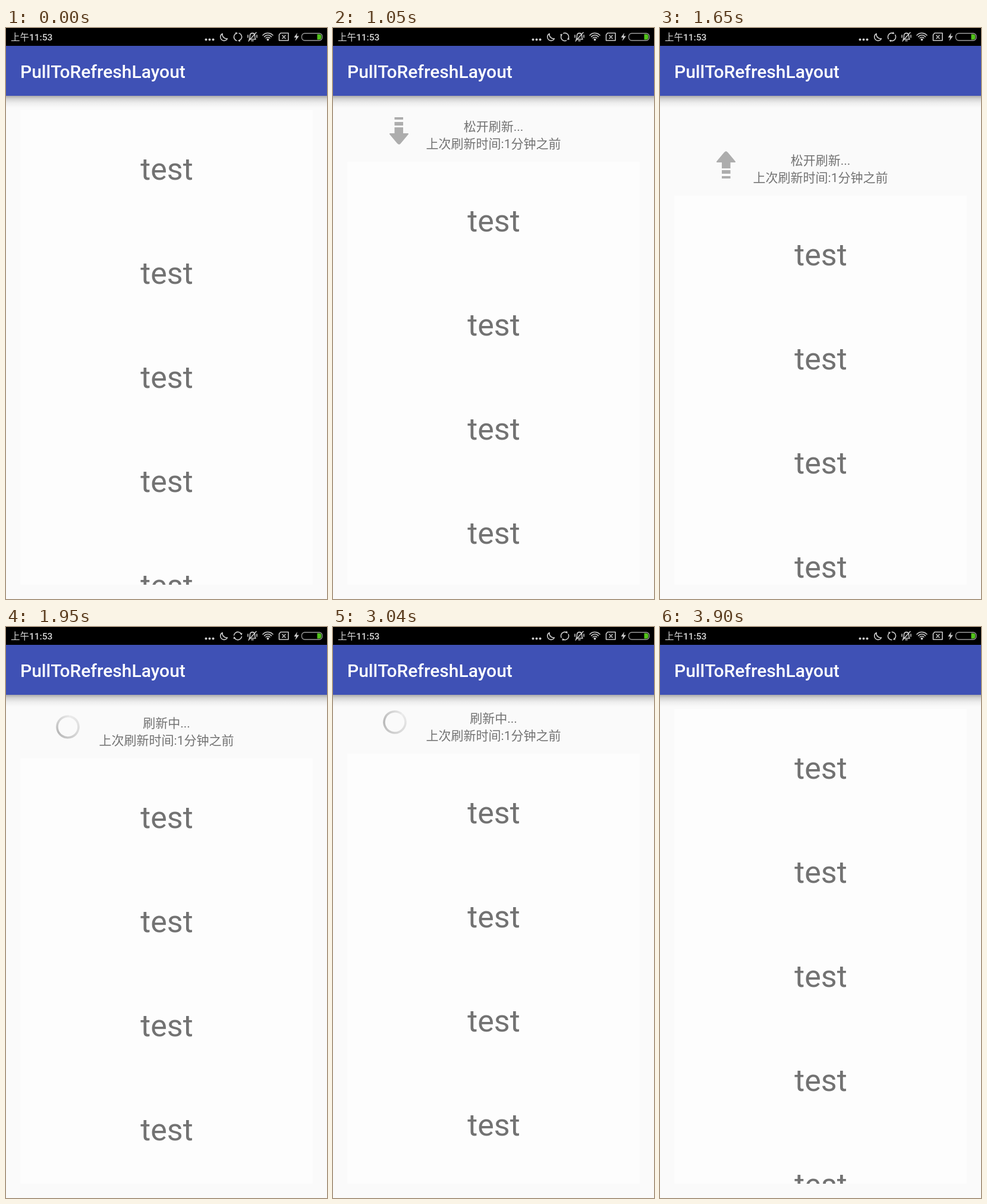
These frames come from a looping animation (540x960 px, 4020 ms). An HTML page with a canvas:

```html
<!DOCTYPE html>
<html lang="zh">
<head>
<meta charset="utf-8">
<title>PullToRefreshLayout</title>
<style>
  html, body { margin: 0; width: 100%; height: 100%; overflow: hidden; background: #fafafa; }
  canvas { display: block; }
</style>
</head>
<body>
<canvas id="stage" width="540" height="960"></canvas>
<script>
const ctx = document.getElementById('stage').getContext('2d');
const LOOP = 4020, TAU = Math.PI * 2;
const LIST = { left: 24, top: 138, right: 516, bottom: 936, row: 175 };
const HEADER = 75, RELEASE = 1750, CLOSE = 3327, SETTLE = 300, FLIP = 1050;
const FONT = 'Roboto, "Noto Sans CJK SC", "Noto Sans CJK", sans-serif';
const PAGE = '#fafafa', ICON = '#cbcbcb', INK = '#727272';

// Finger position while dragging: [ms, px]
const drag = [[620, 0], [700, 9], [790, 28], [920, 59], [1050, 87],
              [1200, 112], [1400, 133], [1650, 144], [RELEASE, 145]];

const clamp = v => Math.min(1, Math.max(0, v));
const decelerate = p => 1 - (1 - clamp(p)) ** 2;
const smooth = p => (1 - Math.cos(Math.PI * clamp(p))) / 2;

function pullAt(t) {
  if (t <= drag[0][0]) return 0;
  if (t >= CLOSE) return HEADER * (1 - decelerate((t - CLOSE) / SETTLE));
  if (t >= RELEASE) return 145 + (HEADER - 145) * decelerate((t - RELEASE) / SETTLE);
  const i = drag.findIndex(([time]) => time >= t);
  const [t0, y0] = drag[i - 1], [t1, y1] = drag[i];
  return y0 + (y1 - y0) * (t - t0) / (t1 - t0);
}

function text(str, x, y, size, color, align = 'center', weight = 400) {
  ctx.font = `${weight} ${size}px ${FONT}`;
  ctx.fillStyle = color;
  ctx.textAlign = align;
  ctx.fillText(str, x, y);
}

function rect(x, y, w, h, color) {
  ctx.fillStyle = color;
  ctx.fillRect(x, y, w, h);
}

function at(x, y, angle, paint) {
  ctx.save();
  ctx.translate(x, y);
  ctx.rotate(angle);
  paint();
  ctx.restore();
}

const fillPath = d => ctx.fill(new Path2D(d));
const strokePath = d => ctx.stroke(new Path2D(d));

function arc(x, y, r, from, to) {
  ctx.beginPath();
  ctx.arc(x, y, r, from, to);
  ctx.stroke();
}

function dot(x, y, r) {
  ctx.beginPath();
  ctx.arc(x, y, r, 0, TAU);
  ctx.fill();
}

function statusBar(t) {
  rect(0, 0, 540, 30, '#000');
  text('上午11:53', 8, 21, 15.5, '#d8d8d8', 'left', 500);
  ctx.strokeStyle = ctx.fillStyle = ICON;
  ctx.lineWidth = 1.6;
  ctx.lineCap = ctx.lineJoin = 'round';

  for (const x of [336.5, 342.5, 348.5]) dot(x, 19.5, 2);
  strokePath('M364 9.5A6.3 6.3 0 1 0 372.5 18A7.5 7.5 0 0 1 364 9.5Z');

  // Sync icon: two arcs with small tips, half a turn per 1340 ms
  at(390, 15, Math.PI * t / 1340, () => {
    for (const turn of [0, Math.PI]) at(0, 0, turn, () => {
      arc(0, 0, 6.6, -1.25, 1.25);
      fillPath('M0 6.6L3.5 4L4 8.2Z');
    });
  });

  strokePath('M409 19H420C418 17 419 14 418.5 12C417.5 7.5 411.5 7.5 410.5 12C410 15 411 17 409 19Z' +
             'M413 21.5H416M407 12V16M422 12V16M408 22L421 7.5');

  for (const r of [4.5, 8, 11.5]) arc(440.5, 20, r, -2.4, -0.74);
  dot(440.5, 19.5, 1.9);

  strokePath('M462 8.5H475V21H459.5V11.5ZM465 12.5L470 17.5M470 12.5L465 17.5');
  fillPath('M490 8L484.5 16H488L486.5 22L493 13.5H489Z');

  ctx.strokeStyle = '#9c9c9c';
  ctx.lineWidth = 1.3;
  ctx.beginPath();
  ctx.roundRect(497.5, 9, 34.5, 12, 5);
  ctx.stroke();
  ctx.fillStyle = '#52c41a';
  ctx.beginPath();
  ctx.roundRect(523.5, 10.5, 7, 9, [0, 3.5, 3.5, 0]);
  ctx.fill();
}

function appBar() {
  rect(0, 30, 540, 84, '#3f51b5');
  text('PullToRefreshLayout', 24, 84, 30, '#fff', 'left', 500);
  const shadow = ctx.createLinearGradient(0, 114, 0, 134);
  shadow.addColorStop(0, 'rgba(0,0,0,.32)');
  shadow.addColorStop(.25, 'rgba(0,0,0,.16)');
  shadow.addColorStop(.6, 'rgba(0,0,0,.05)');
  shadow.addColorStop(1, 'rgba(0,0,0,0)');
  rect(0, 114, 540, 20, shadow);
}

function arrow(x, y, angle) {
  at(x, y, angle, () => {
    ctx.fillStyle = ctx.strokeStyle = '#adadad';
    fillPath('M-7.5 -23H7V-19H-7.5ZM-7.5 -15H7V-9H-7.5ZM-7.5 -6H7V6H-7.5Z');
    ctx.lineWidth = 2;
    ctx.lineJoin = 'round';
    const head = 'M-15 5H15L2 20.5Q0 23 -2 20.5Z';
    fillPath(head);
    strokePath(head);
  });
}

function spinner(x, y, t) {
  at(x, y, (t - 2360) / 1000 * TAU, () => {
    const sweep = ctx.createConicGradient(Math.PI * .35, 0, 0);
    sweep.addColorStop(0, '#ececec');
    sweep.addColorStop(.3, '#dadada');
    sweep.addColorStop(.65, '#b8b8b8');
    sweep.addColorStop(1, '#e8e8e8');
    ctx.strokeStyle = sweep;
    ctx.lineWidth = 3.6;
    arc(0, 0, 18, 0, TAU);
  });
}

function header(top, t) {
  const line = (str, dy) => text(str, 270, top + dy, 21, INK);
  if (t < RELEASE) {
    arrow(111, top - 52, Math.PI * smooth((t - FLIP) / 200));
    if (top - LIST.top < HEADER) return line('下拉刷新...', -37);
    line('松开刷新...', -52);
  } else {
    spinner(104, top - 53, t);
    line('刷新中...', -52);
  }
  line('上次刷新时间:1分钟之前', -23);
}

function list(t) {
  const pull = Math.round(pullAt(t)), top = LIST.top + pull;
  ctx.save();
  ctx.beginPath();
  ctx.rect(LIST.left, LIST.top, LIST.right - LIST.left, LIST.bottom - LIST.top);
  ctx.clip();
  if (pull > 0) header(top, t);
  rect(LIST.left, top, LIST.right - LIST.left, LIST.bottom - top, '#fdfdfd');
  for (let i = 0; i < 5; i++) text('test', 270.5, top + 117 + i * LIST.row, 52, INK);
  ctx.restore();
}

function frame(now) {
  const t = now % LOOP;
  rect(0, 0, 540, 960, PAGE);
  list(t);
  appBar();
  statusBar(t);
  requestAnimationFrame(frame);
}
requestAnimationFrame(frame);
</script>
</body>
</html>
```
